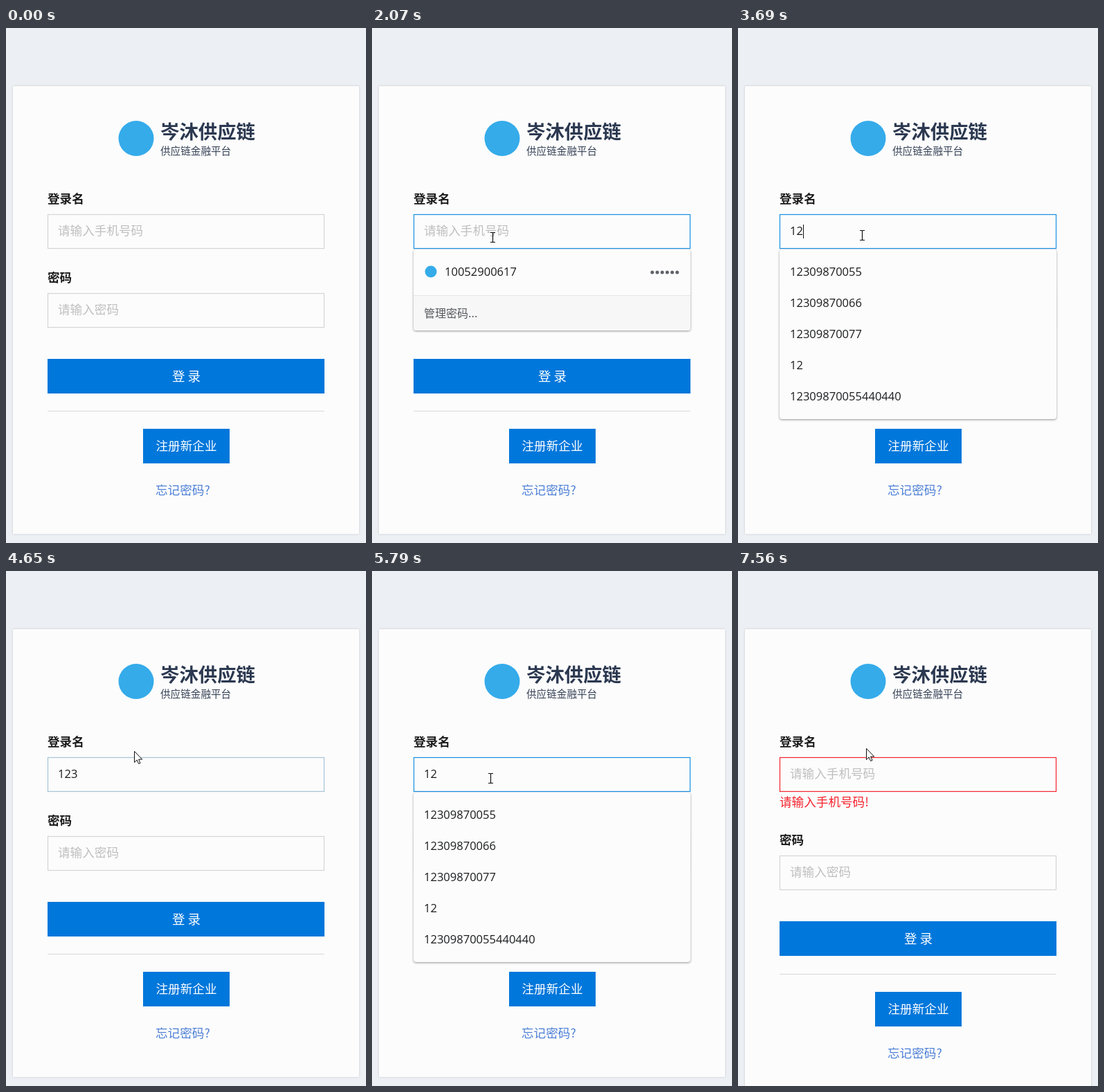
An HTML page that plays this animation: 520x744 px, repeating every 8000 ms.

```html
<!DOCTYPE html>
<html lang="zh-CN">
<head>
<meta charset="utf-8">
<title>登录</title>
<style>
  html, body { margin: 0; width: 100%; height: 100%; overflow: hidden; background: #ecf0f4; }
  svg { display: block; font: 17.6px "Noto Sans CJK SC", "Noto Sans CJK", "Noto Sans", sans-serif; }
  .label { font-weight: 700; fill: #1c1c1c; }
  .hint { fill: #bfbfbf; }
  .digits { font: 16.55px "Open Sans", "Noto Sans", sans-serif; fill: #1b1c1e; }
  .field { fill: #fcfcfc; stroke: #d5d5d5; stroke-width: 1.2; }
  .button { fill: #0077db; }
  .mid { text-anchor: middle; fill: #fff; }
  .logo { fill: #35abea; }
  .card { fill: #fcfcfc; filter: drop-shadow(0 0 1.5px rgba(0, 0, 0, .17)); }
  .popup { fill: #fcfcfc; filter: drop-shadow(0 1.5px 1.8px rgba(0, 0, 0, .42)); }
</style>
</head>
<body>
<svg width="520" height="744" viewBox="0 0 520 744">
  <rect class="card" id="card" x="10" y="84" width="500" height="647" rx="1"/>

  <circle class="logo" cx="188" cy="159.5" r="25.5"/>
  <text x="223" y="160" font-size="27.4" font-weight="700" fill="#2b3850">岑沐供应链</text>
  <text x="223" y="183" font-size="14.6" font-weight="500" fill="#364256">供应链金融平台</text>

  <text class="label" x="60" y="253">登录名</text>
  <rect class="field" id="login" x="60.5" y="269.5" width="399" height="49"/>
  <text class="hint" id="hint" x="75" y="299">请输入手机号码</text>
  <text class="digits" id="value" x="75" y="299"></text>
  <rect id="caret" y="284" width="1" height="20" fill="#111"/>
  <text id="error" x="60" y="340" fill="#f5222d">请输入手机号码!</text>

  <g id="upper">
    <text class="label" x="60" y="367">密码</text>
    <rect class="field" x="60.5" y="383.5" width="399" height="49"/>
    <text class="hint" x="75" y="413">请输入密码</text>
    <rect class="button" x="60" y="478" width="400" height="50"/>
    <text class="mid" x="260.5" y="510" font-size="18.5">登 录</text>
  </g>
  <g id="lower">
    <path d="M60 553.5H460" stroke="#d9d9d9"/>
    <rect class="button" x="198" y="579" width="125" height="50"/>
    <text class="mid" x="260.5" y="610">注册新企业</text>
    <text x="216" y="674" fill="#4c7fd6">忘记密码?</text>
  </g>

  <g id="saved">
    <rect class="popup" x="60" y="320" width="400" height="117" rx="4"/>
    <path d="M60 386H460V433Q460 437 456 437H64Q60 437 60 433Z" fill="#f7f7f7"/>
    <path d="M60 386.5H460" stroke="#e6e6e6"/>
    <circle class="logo" cx="85" cy="352" r="8.5"/>
    <text class="digits" x="105" y="358">10052900617</text>
    <path d="M404.8 353H442" stroke="#5f6368" stroke-width="5" stroke-linecap="round" stroke-dasharray="0 7.2"/>
    <text x="75" y="418" font-size="16" fill="#55585c">管理密码...</text>
  </g>
  <g id="history">
    <rect class="popup" id="listBox" x="60" y="320" width="400" rx="4"/>
    <g id="rows"></g>
  </g>

  <path id="arrow" d="M.5 .5V16.5L4.2 13L6.6 18.5L9 17.4L6.6 12.1H11.7Z" fill="#fff" stroke="#111"/>
  <path id="beam" d="M-3.5 -7H-1Q0 -7 0 -6Q0 -7 1 -7H3.5M0 -6V6M-3.5 7H-1Q0 7 0 6Q0 7 1 7H3.5" fill="none" stroke="#111" stroke-width="1.2"/>
</svg>
<script>
const LOOP = 8000, BLINK = 480, FADE = 300, FADE_STEPS = 20, ROW = 45;
const GRAY = [213, 213, 213], BLUE = [24, 144, 226], ROSE = [250, 72, 76], RED = [245, 34, 45];
const entries = ['12309870055', '12309870066', '12309870077', '12', '12309870055440440'];

// what the user does: clicks and keys
const actions = [
  { at: 0, text: '', open: false },
  { at: 1170, open: true },
  { at: 2490, open: false },
  { at: 2970, open: true },
  { at: 3420, text: '1' },
  { at: 3660, text: '12' },
  { at: 3960, text: '123' },
  { at: 4440, open: false },
  { at: 5010, open: true },
  { at: 5760, text: '12' },
  { at: 5940, text: '1' },
  { at: 6210, text: '', failed: true },
  { at: 7290, open: false }
];

// mouse moves, each starting where the last one ended
const moves = [
  { from: 300, to: 930, x: 174, y: 302 },
  { from: 2160, to: 2430, x: 185, y: 236 },
  { from: 2610, to: 2850, x: 179, y: 299 },
  { from: 4110, to: 4380, x: 188, y: 248 },
  { from: 4560, to: 4890, x: 171, y: 299 },
  { from: 6870, to: 7110, x: 185, y: 256 }
];

const $ = id => document.getElementById(id);
const show = (id, on) => $(id).setAttribute('visibility', on ? 'visible' : 'hidden');
const set = (id, name, value) => $(id).setAttribute(name, value);

// deleting a character does not restart the caret's blinking
function stateAt(t) {
  const state = { text: '', blinkFrom: 0 };
  for (const action of actions.filter(a => a.at <= t)) {
    const erased = 'text' in action && action.text.length < state.text.length;
    if (!erased) state.blinkFrom = action.at;
    Object.assign(state, action);
  }
  return state;
}

function pointerAt(t) {
  let x = 522, y = 95;
  for (const m of moves) {
    const p = Math.min(1, Math.max(0, (t - m.from) / (m.to - m.from)));
    const s = p * p * (3 - 2 * p);
    x += (m.x - x) * s;
    y += (m.y - y) * (1 - (1 - s) ** 1.3); // slightly bowed path
  }
  x = Math.round(x);
  y = Math.round(y);
  return { x, y, inside: x > 60 && x < 460 && y >= 269 && y < 319 };
}

function borderTarget(t) {
  const { open, failed } = stateAt(t);
  if (failed) return open ? ROSE : RED;
  return open || pointerAt(t).inside ? BLUE : GRAY;
}

// averaging the recent targets gives a linear colour transition
function borderColor(t) {
  const sum = [0, 0, 0];
  for (let i = 0; i < FADE_STEPS; i++) {
    borderTarget(Math.max(0, t - i * FADE / FADE_STEPS)).forEach((v, n) => sum[n] += v);
  }
  return `rgb(${sum.map(v => Math.round(v / FADE_STEPS))})`;
}

function drawPopups(text, open) {
  const list = text.length > 1;
  show('saved', open && !list);
  show('history', open && list);
  const hits = entries.filter(e => e.startsWith(text));
  set('listBox', 'height', hits.length * ROW + 20);
  $('rows').innerHTML = hits.map((e, i) => `<text class="digits" x="75" y="${358 + i * ROW}">${e}</text>`).join('');
}

function draw(t) {
  const { text, open, failed, blinkFrom } = stateAt(t);
  $('value').textContent = text;
  show('hint', !text);
  show('caret', open && Math.floor((t - blinkFrom) / BLINK) % 2 === 0);
  set('caret', 'x', Math.round(75 + text.length * 9.45));
  $('login').style.stroke = borderColor(t);
  drawPopups(text, open);

  show('error', failed);
  set('upper', 'transform', `translate(0 ${failed ? 28 : 0})`);
  set('lower', 'transform', `translate(0 ${failed ? 29 : 0})`);
  set('card', 'height', failed ? 676 : 647);

  const { x, y, inside } = pointerAt(t);
  show('arrow', !inside);
  show('beam', inside);
  set('arrow', 'transform', `translate(${x} ${y})`);
  set('beam', 'transform', `translate(${x + .5} ${y + .5})`);
}

const start = performance.now();
function tick() {
  draw((performance.now() - start) % LOOP);
  requestAnimationFrame(tick);
}
tick();
</script>
</body>
</html>
```
